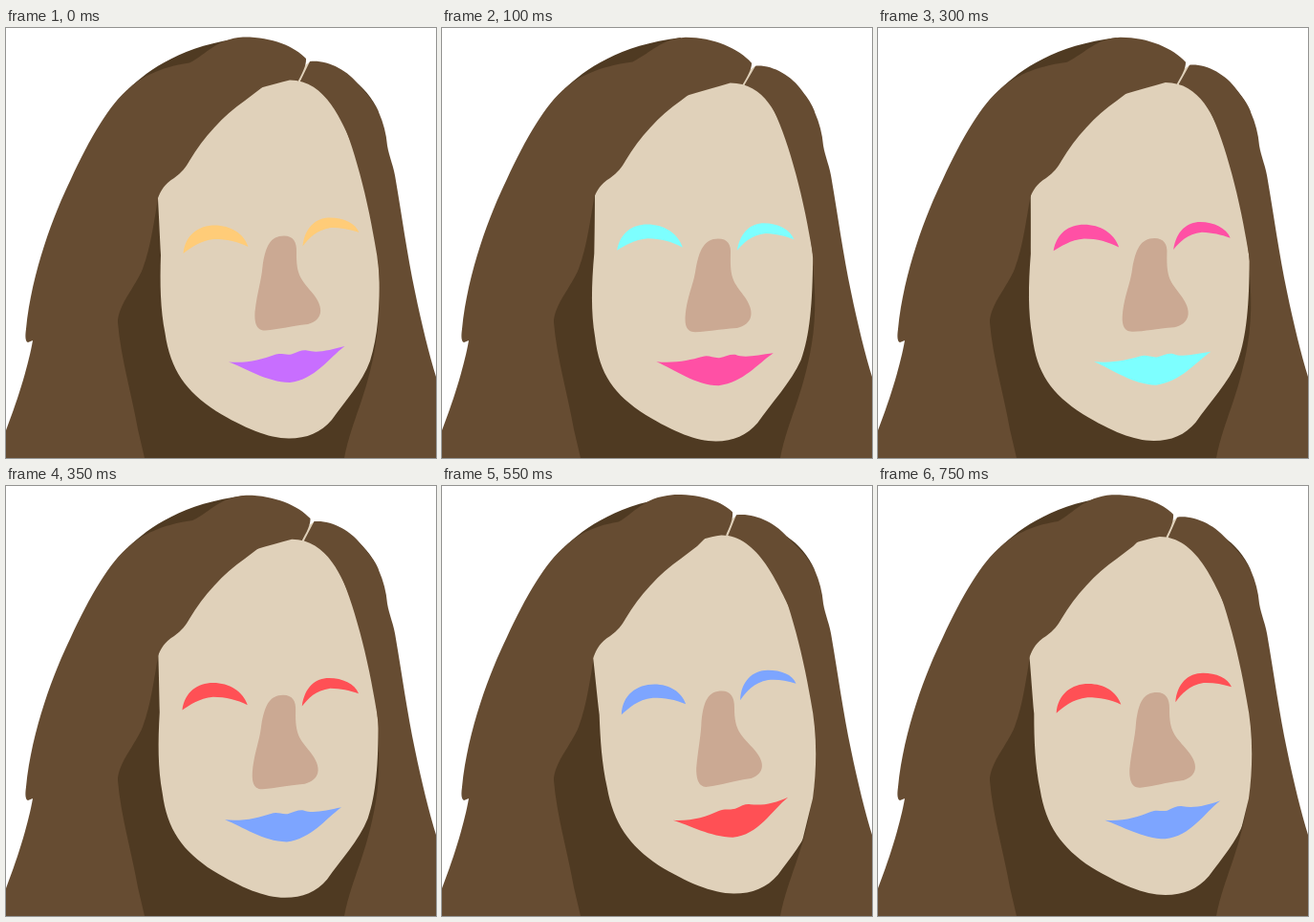
These frames come from a looping animation (450x450 px, 0.8 s). An HTML page:

```html
<!DOCTYPE html>
<html lang="en">
<head>
<meta charset="utf-8">
<title>Swaying head</title>
<style>
  html, body { margin: 0; width: 100%; height: 100%; overflow: hidden; background: #fff; }
  svg { display: block; width: 100vw; height: 100vh; }
  .hair { fill: #664c32; }
  .shade { fill: #4f3a22; }
  .skin { fill: #e0d1ba; }
  .nose { fill: #cba993; }
</style>
</head>
<body>
<svg viewBox="0 0 450 450">
  <clipPath id="opening">
    <path d="M100 450L150 200L159 178C162 170 166 163 176 157C184 151 188 146 192 139C207 114 227 92 250 76L267 63L279 51L290 30H345V82C360 110 377 170 386 225C392 255 393 290 388 327L370 400L354 450Z"/>
  </clipPath>
  <path class="shade" d="M128 64C150 43 185 18 250 10L230 60ZM350 60L361 53C372 60 384 73 390 88Z"/>
  <path class="skin" id="parting"/>
  <path class="hair" id="left"/>
  <path class="hair" id="right"/>
  <path class="shade" d="M160 174C155 200 152 228 143 252C136 270 117 290 117 308C120 345 132 385 138 420L145 450H354C362 410 378 385 387 330C392 300 391 268 386 228L300 200Z"/>
  <g clip-path="url(#opening)"><path class="skin" id="face"/></g>
  <path class="nose" id="nose"/>
  <path id="browL"/>
  <path id="browR"/>
  <path id="mouth"/>
</svg>
<script>
// Each part has two extreme poses: head turned left, head turned right.
const sideL = 'M0 421C14 385 24 350 28 327L23 329C20 328 20 322 21 315C27 255 50 195 68 158C88 115 108 80 130 62';
const sideR = 'C395 99 398 111 399 123C401 135 406 145 408 160C414 195 420 238 428 276C435 310 443 342 450 365V450H300Z';
const poses = {
  parting: ['M317 64L327 46L333 42L322 63Z', 'M290 52L297 33L303 29L296 52Z'],
  left: [
    sideL + 'C145 50 165 40 203 35C225 24 235 11 258 10C287 10 315 23 329 39C329 45 324 53 319 61L330 450H0Z',
    sideL + 'C140 54 152 43 181 38C196 30 205 12 238 9C267 8 289 15 299 25C300 33 296 42 293 49L330 450H0Z'
  ],
  right: [
    'M321 61L333 42C350 41 369 52 380 68C385 75 389 82 390 88' + sideR,
    'M295 50L303 28C320 25 345 34 361 54C368 61 381 71 390 88' + sideR
  ],
  face: [
    'M161 160C160 195 159 220 158 235C154 270 153 300 157 325C161 365 176 385 210 407C240 425 262 434 282 434C300 434 314 428 325 415C340 393 362 370 373 347C383 322 386 285 387 235C385 200 372 150 360 115C352 90 340 59 304 59C288 64 270 69 250 75L230 83L170 120Z',
    'M155 160C160 195 163 220 166 240C168 265 170 288 176 314C183 350 200 375 230 395C258 412 287 425 310 425C330 425 345 419 357 405C368 390 384 372 389 350C395 325 397 300 394 270C390 230 379 175 367 135C352 108 330 50 290 50C285 50 281 51 277 52L230 83L170 120Z'
  ],
  nose: [
    'M288 222C298 222 302 228 301 238C300 265 304 268 313 281C327 300 321 313 305 316C285 317 275 319 262 319C251 319 251 309 252 300C255 278 261 272 264 254C268 235 273 222 288 222Z',
    'M294 213C303 213 307 220 307 231C307 254 315 259 327 272C341 286 342 298 327 304C308 307 296 312 281 314C271 315 269 304 269 294C271 272 273 260 273 245C275 222 280 213 294 213Z'
  ],
  browL: [
    'M182 231C186 213 198 205 213 205C230 205 246 214 251 230C240 224 228 220 214 220C200 221 190 227 182 231Z',
    'M189 241C189 220 205 208 224 208C240 208 252 216 256 228C245 223 234 222 222 222C205 224 196 234 189 241Z'
  ],
  browR: [
    'M308 235C312 215 323 207 336 207C350 207 364 214 368 225C358 221 350 219 338 218C322 220 315 227 308 235Z',
    'M313 222C313 203 325 190 342 190C356 190 367 194 371 203C360 200 352 199 342 200C327 203 319 213 313 222Z'
  ],
  mouth: [
    'M220 349C240 351 255 348 268 345C275 343 279 347 286 347C293 346 298 343 303 344C312 349 325 345 343 344C326 355 312 372 286 376C260 375 240 358 220 349Z',
    'M246 350C265 351 280 346 294 339C301 336 304 338 311 336C318 332 322 330 327 331C340 332 354 329 366 322C349 336 335 364 308 366C285 366 262 354 246 350Z'
  ]
};
const colors = ['#ffcc78', '#80ff78', '#7dffff', '#7da5ff', '#c86eff', '#ff48f8', '#ff50a5', '#ff5055'];
// [step, turn], turn from -1 (left) to 1 (right)
const keys = [[0, 0], [2, -.67], [3, -.95], [4, -1], [7, -.3], [9, .2], [12, .9], [13, 1], [15, .33], [16, 0]];
const steps = 16, stepMs = 50;

const el = id => document.getElementById(id);

function turnAt(step) {
  const i = keys.findIndex(k => k[0] > step);
  const [s0, v0] = keys[i - 1], [s1, v1] = keys[i];
  return v0 + (v1 - v0) * (step - s0) / (s1 - s0);
}

function mix(a, b, k) {
  const to = b.match(/\d+/g);
  let i = 0;
  return a.replace(/\d+/g, n => (+n + (to[i++] - n) * k).toFixed(2));
}

function draw(step) {
  const k = (turnAt(step) + 1) / 2;
  for (const id in poses) el(id).setAttribute('d', mix(...poses[id], k));
  const brow = colors[step % 8];
  el('browL').setAttribute('fill', brow);
  el('browR').setAttribute('fill', brow);
  el('mouth').setAttribute('fill', colors[(step + 4) % 8]);
}

const start = performance.now();
let last = 0;
function tick() {
  const step = Math.floor((performance.now() - start) / stepMs) % steps;
  if (step !== last) draw(last = step);
  requestAnimationFrame(tick);
}
draw(0);
requestAnimationFrame(tick);
</script>
</body>
</html>
```
